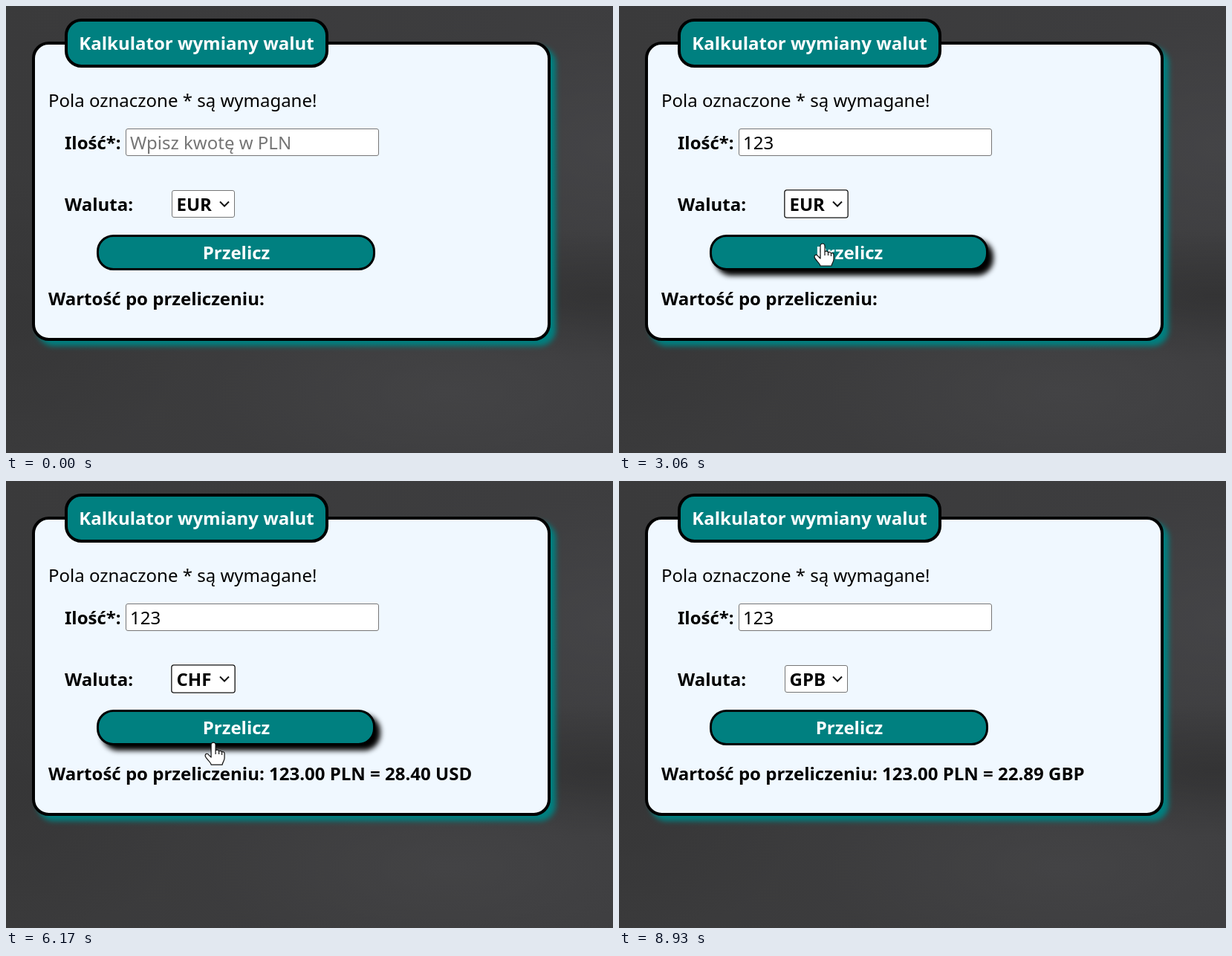
An HTML page for the animation above (9330 ms loop, 817 by 602 pixels).

```html
<!DOCTYPE html>
<html lang="pl">
<head>
<meta charset="utf-8">
<title>Kalkulator wymiany walut</title>
<style>
  html, body { margin: 0; width: 100%; height: 100%; overflow: hidden; background: #3c3c3d; }
  .stage {
    position: relative; width: 817px; height: 602px; overflow: hidden;
    background:
      radial-gradient(ellipse 330px 130px at 600px 520px, #47474999, transparent),
      radial-gradient(ellipse 300px 90px at 800px 390px, #313132cc, transparent),
      radial-gradient(ellipse 300px 170px at 817px 190px, #48484b99, transparent),
      radial-gradient(ellipse 260px 200px at 0 420px, #343435aa, transparent),
      linear-gradient(100deg, #3a3a3b, #3e3e40);
  }
  svg { position: absolute; inset: 0; display: block; }
  text { font: 24px "Noto Sans", "Open Sans", sans-serif; white-space: pre; }
  .bold { font-weight: 700; }
  .light { fill: #fff; text-anchor: middle; }
  .teal { fill: teal; stroke: #000; }
  .panel { fill: #f0f8ff; stroke: #000; stroke-width: 4; filter: drop-shadow(7.5px 7.5px 3.75px teal); }
  .button.hover { filter: drop-shadow(7.5px 7.5px 3.75px #000); }
  .field { fill: #fff; stroke: #767676; }
  .field.hover { stroke: #4b4b4b; }
  .focus { stroke: #101010; stroke-width: 2.6; paint-order: stroke; filter: drop-shadow(0 0 1px #fff); }
  .list { fill: #fff; stroke: #8a8a8a; filter: drop-shadow(0 2px 2px #0005); }
  .cursor { fill: #fff; stroke: #111; stroke-width: 1.2; stroke-linejoin: round; }
</style>
</head>
<body>
<div class="stage">
<svg width="817" height="602" viewBox="0 0 817 602">
  <rect class="panel" x="37" y="50" width="694" height="399" rx="20.5"/>
  <rect class="teal" x="81" y="19" width="351" height="62" rx="20.5" stroke-width="4"/>
  <text class="bold light" x="256.5" y="59">Kalkulator wymiany walut</text>
  <text x="57" y="136">Pola oznaczone * są wymagane!</text>

  <text class="bold" x="79" y="193">Ilość*:</text>
  <rect id="input" class="field" x="161.5" y="165.5" width="340" height="36" rx="2.5"/>
  <g id="inputTools">
    <path fill="#efefef" d="M474 170h22v28h-22z"/>
    <path fill="#505050" d="M479.5 180.5l5.5-6 5.5 6zM479.5 187l5.500 6 5.500-6z"/>
    <path id="caret" d="M0 171v26" stroke="#000" stroke-width="1.5"/>
  </g>
  <text id="amount" x="167" y="193"></text>

  <text class="bold" x="79" y="276">Waluta:</text>
  <rect id="select" class="field" x="223.5" y="248.5" width="84" height="36" rx="2.5"/>
  <text id="currency" class="bold" x="229.5" y="276"></text>
  <path d="M288 263.500l6 6 6-6" fill="none" stroke="#111" stroke-width="2"/>

  <rect id="button" class="teal button" x="123.5" y="309.5" width="372" height="45" rx="21" stroke-width="3"/>
  <text class="bold light" x="310" y="341">Przelicz</text>
  <text id="result" class="bold" x="57" y="403"></text>

  <g id="list">
    <rect class="list" x="225.5" y="285.5" width="83" height="136.5"/>
    <rect id="marked" x="226" width="82" height="34" fill="#1e90ff"/>
  </g>

  <circle id="click" r="18" fill="#fff01e" opacity=".6"/>
  <g id="pointer">
    <path id="arrow" class="cursor" d="M0 0V22.500l5-4.700 3.800 8.700 4-1.700-3.700-8.500h6.900z"/>
    <path id="hand" class="cursor" d="M-3 3a3 3 0 0 1 6 0v8a2.600 2.600 0 0 1 4.500 1 2.600 2.600 0 0 1 4 1 2.300 2.300 0 0 1 3.500 2v6c0 4-2.500 5-3 9H-3c0-3-7-8-8-12 0-3 3-4 5-1l3 3zM3 11v5M7.500 12v4M11.500 13v4"/>
    <path id="beam" d="M-4-11q4 0 4 3V8q0 3-4 3M4-11q-4 0-4 3M0 8q0 3 4 3" fill="none" stroke="#222" stroke-width="1.4"/>
  </g>
</svg>
</div>
<script>
const LOOP = 9330, ENTER = 200, TYPE = 1410, KEY = 70, LEAVE = 8930;
const INPUT_CLICK = 1140, ROW = 34, LIST_TOP = 286;

// Each round opens the list, chooses a currency and presses the button (ms)
const ROUNDS = [
  { name: 'EUR', sum: '27.60 EUR', open: 2080, choose: 2610, press: 3265, select: [261, 263], button: [274, 320] },
  { name: 'USD', sum: '28.40 USD', open: 4070, choose: 4470, press: 5075, select: [281, 261], button: [333, 332] },
  { name: 'CHF', sum: '26.11 CHF', open: 5630, choose: 6120, press: 6495, select: [256, 253], button: [302, 319] },
  { name: 'GPB', sum: '22.89 GBP', open: 7090, choose: 7560, press: 8190, select: [275, 258], button: [308, 330] }
];
const PRESS_TIME = 70;

const el = id => document.getElementById(id);
const show = (id, on) => { el(id).style.display = on ? '' : 'none'; };
const between = (t, from, to) => t >= from && t < to;
const inside = ([x, y], l, t, r, b) => x >= l && x <= r && y >= t && y <= b;
const clamp = (v, low, high) => Math.min(high, Math.max(low, v));
const optionPoint = i => [266, LIST_TOP + ROW * (i + 0.5)];

// Pointer stops: when it arrives, when it departs, where it rests
const STOPS = [
  { arrive: 0, depart: ENTER, at: [656, 588] },
  { arrive: 1070, at: [330, 177] },
  ...ROUNDS.flatMap((r, i) => [
    { arrive: r.open - 140, depart: r.open + 110, at: r.select },
    { arrive: r.choose - 130, depart: r.choose, at: optionPoint(i) },
    { arrive: r.press - 250, at: r.button }
  ]),
  { arrive: LEAVE, at: [706, 612] }
];
STOPS.forEach((stop, i) => {
  const next = STOPS[i + 1];
  if (!next) return;
  const last = i === STOPS.length - 2;
  stop.depart ??= last ? stop.arrive + 250 + PRESS_TIME : next.arrive - 160;
});

function pointerAt(t) {
  if (!between(t, ENTER, LEAVE)) return null;
  const i = STOPS.findIndex(stop => stop.arrive > t);
  const from = STOPS[i - 1], to = STOPS[i];
  const k = clamp((t - from.depart) / (to.arrive - from.depart), 0, 1);
  const eased = k * k * (3 - 2 * k);
  return from.at.map((v, axis) => v + (to.at[axis] - v) * eased);
}

const clicking = t => between(t, INPUT_CLICK, INPUT_CLICK + 130) || ROUNDS.some(r =>
  between(t, r.open, r.open + 130) ||
  between(t, r.choose - PRESS_TIME, r.choose) ||
  between(t, r.press, r.press + PRESS_TIME));

ROUNDS.forEach(({ name }, i) => {
  const label = document.createElementNS('http://www.w3.org/2000/svg', 'text');
  label.setAttribute('x', 230.5);
  label.setAttribute('y', LIST_TOP + 26 + ROW * i);
  label.textContent = name;
  el('list').append(label);
});

function drawPointer(p, t, open) {
  const overButton = !!p && !open && inside(p, 122, 308, 497, 356);
  const overInput = !!p && inside(p, 161, 165, 502, 202);
  show('pointer', p);
  show('click', p && clicking(t));
  show('hand', overButton);
  show('beam', overInput);
  show('arrow', !overButton && !overInput);
  el('button').classList.toggle('hover', overButton);
  el('select').classList.toggle('hover', !!p && !open && inside(p, 223, 248, 308, 285));
  if (p) for (const id of ['pointer', 'click']) el(id).setAttribute('transform', `translate(${p})`);
}

function drawList(p, current) {
  const over = p[1] < LIST_TOP ? current : clamp(Math.floor((p[1] - LIST_TOP) / ROW), 0, 3);
  el('marked').setAttribute('y', LIST_TOP + ROW * over);
  el('list').querySelectorAll('text').forEach((label, i) => {
    label.setAttribute('fill', i === over ? '#fff' : '#111');
  });
}

function draw(t) {
  const digits = clamp(Math.floor((t - TYPE) / KEY) + 1, 0, 3);
  const current = Math.max(0, ROUNDS.findLastIndex(r => t >= r.choose));
  const done = ROUNDS.findLast(r => t >= r.press + PRESS_TIME);
  const open = ROUNDS.some(r => between(t, r.open, r.choose));
  const inputFocus = between(t, INPUT_CLICK, ROUNDS[0].open);
  const p = pointerAt(t);

  el('amount').textContent = digits ? '123'.slice(0, digits) : 'Wpisz kwotę w PLN';
  el('amount').setAttribute('fill', digits ? '#000' : '#757575');
  el('caret').setAttribute('transform', `translate(${167.3 + 13.73 * digits})`);
  el('currency').textContent = ROUNDS[current].name;
  el('result').textContent = 'Wartość po przeliczeniu:' + (done ? ` 123.00 PLN = ${done.sum}` : '');

  show('inputTools', inputFocus);
  el('input').classList.toggle('focus', inputFocus);
  el('select').classList.toggle('focus', ROUNDS.some(r => between(t, r.choose, r.press)));
  show('list', open);
  if (open) drawList(p, current);
  drawPointer(p, t, open);
}

const start = performance.now();
function tick() {
  draw((performance.now() - start) % LOOP);
  requestAnimationFrame(tick);
}
tick();
</script>
</body>
</html>
```
